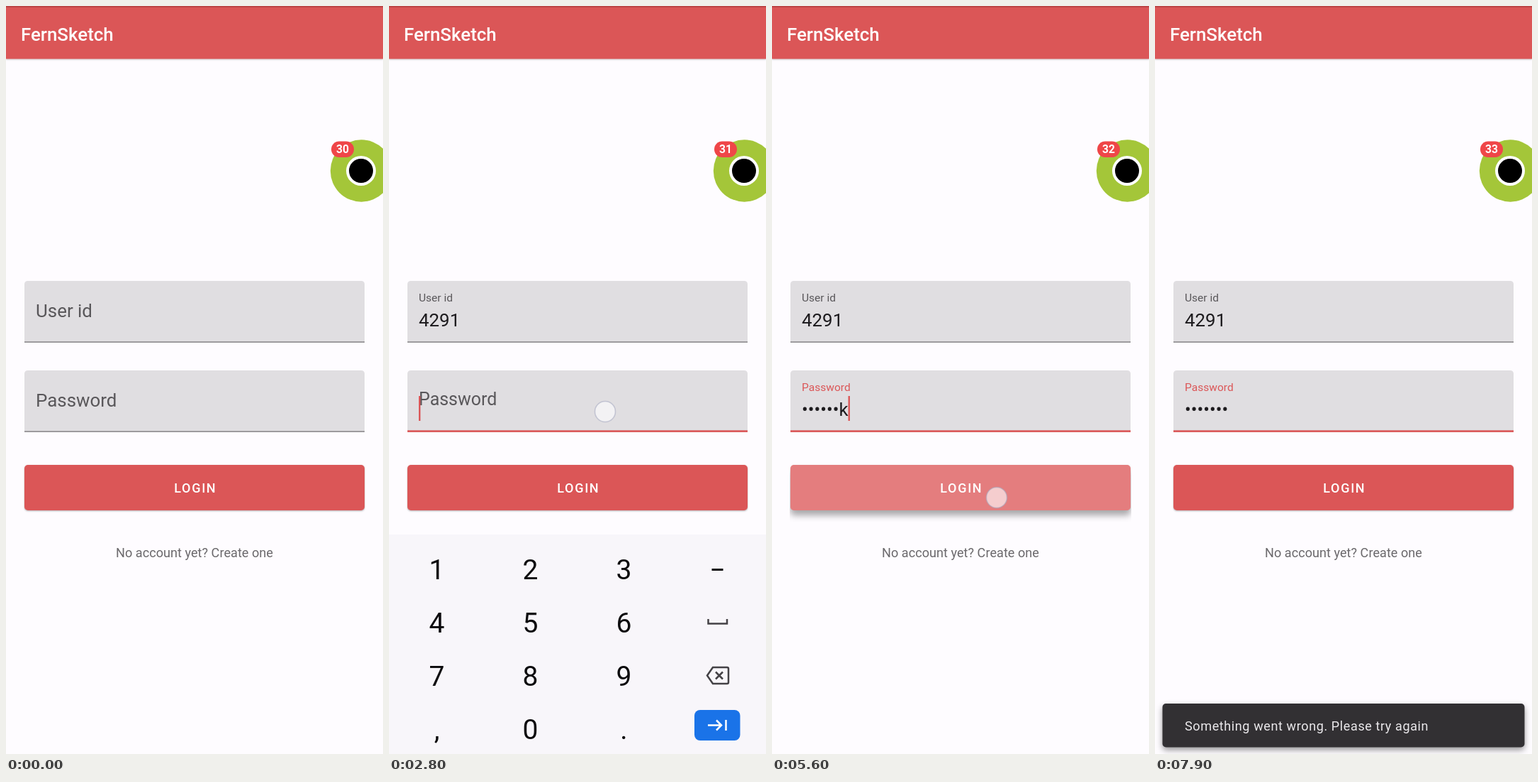
These frames come from a looping animation (532x1053 px, 8000 ms). An HTML page:

```html
<!DOCTYPE html>
<html lang="en">
<head>
<meta charset="utf-8">
<title>Login form</title>
<style>
  html, body { margin: 0; width: 100%; height: 100%; overflow: hidden; background: #fefcff; }
  svg { display: block; width: 100vw; height: 100vh; font-family: Roboto, sans-serif; }
  .medium { font-weight: 500; }
  .mid { text-anchor: middle; }
  .icon { fill: none; stroke: #444246; stroke-width: 2.5; }
  .white { fill: none; stroke: #fff; stroke-width: 2.5; }
  .value { font-size: 25.9px; fill: #1d1b1e; }
</style>
</head>
<body>
<svg id="stage" viewBox="0 0 532 1053">
  <defs>
    <clipPath id="buttonClip"><rect x="26" y="646" width="480" height="64" rx="5"/></clipPath>
    <clipPath id="shadowClip"><rect x="25" y="640" width="482" height="100"/></clipPath>
  </defs>
  <rect width="532" height="1053" fill="#fefcff"/>
  <rect width="532" height="74.5" fill="#db5657" style="filter:drop-shadow(0 1px 1px #0003)"/>
  <rect width="532" height="2" fill="#bd4546"/>
  <text class="medium" x="21" y="48.5" font-size="25.9" fill="#fff">FernSketch</text>

  <g id="fields"></g>

  <g clip-path="url(#shadowClip)"><rect id="button" x="26" y="646" width="480" height="64" rx="5" fill="#db5657"/></g>
  <g clip-path="url(#buttonClip)"><circle id="ripple" cx="317" cy="692" fill="#fff"/></g>
  <text class="medium mid" x="267.3" y="685" font-size="18.1" letter-spacing="1.62" fill="#fff">LOGIN</text>
  <text class="mid" x="266" y="775.5" font-size="18.15" fill="#6b696c">No account yet? Create one</text>

  <circle cx="501.5" cy="232" r="43.7" fill="#a4c639"/>
  <circle cx="501" cy="232" r="21" fill="#fff"/>
  <circle cx="501" cy="232" r="17" fill="#000"/>
  <rect x="459" y="190.5" width="32" height="22.5" rx="11.2" fill="#ef4648"/>
  <text id="badge" class="mid" x="475" y="207.3" font-size="15.6" font-weight="700" fill="#fff"></text>

  <g id="numberPad"></g>
  <g id="letterPad"></g>

  <g id="snack">
    <rect x="10.5" y="982" width="511" height="61.5" rx="5" fill="#323033" style="filter:drop-shadow(0 4px 4px #0006)"/>
    <text x="42" y="1020" font-size="18.1" letter-spacing=".57" fill="#eae8eb">Something went wrong. Please try again</text>
  </g>
  <circle id="touch" r="14.5" fill="#fff" fill-opacity=".62" stroke="#a4a8c0" stroke-opacity=".55" stroke-width="1.6"/>
</svg>
<script>
const LOOP = 8000, RED = '#db5657';
const USER_ID = '4291', PASSWORD = 'fhdjghk';
const USER_FOCUS = 900, PASSWORD_FOCUS = 2770, MASK_DELAY = 1500;
const $ = id => document.getElementById(id);

function add(parent, tag, attrs, content = '') {
  const node = document.createElementNS('http://www.w3.org/2000/svg', tag);
  set(node, attrs);
  node.textContent = content;
  parent.appendChild(node);
  return node;
}
function set(node, attrs) {
  for (const name in attrs) node.setAttribute(name, attrs[name]);
}
const progress = (t, start, length) => Math.min(1, Math.max(0, (t - start) / length));
const smooth = p => p * p * (3 - 2 * p);
const lerp = (a, b, p) => a + (b - a) * p;
const show = (node, visible) => set(node, { visibility: visible ? 'visible' : 'hidden' });

function makeField(top, name) {
  const g = $('fields'), bottom = top + 86.5;
  add(g, 'path', { d: `M26 ${bottom}V${top + 5}q0-5 5-5H501q5 0 5 5V${bottom}z`, fill: '#e0dee1' });
  return {
    top,
    line: add(g, 'rect', { x: 26, width: 480 }),
    label: add(g, 'text', { x: 42 }, name),
    value: add(g, 'text', { x: 42, y: top + 64, class: 'value' }),
    cursor: add(g, 'rect', { y: top + 36, width: 2.4, height: 35, fill: RED })
  };
}

const keys = {};
function keyRow(pad, chars, x, step, y, size) {
  [...chars].forEach((char, i) => {
    const cx = x + i * step;
    add(pad, 'text', { x: cx, y, class: 'mid', 'font-size': size, fill: '#0c0b0d' }, char);
    keys[pad.id + char] = [cx + 2, y - 4];
  });
}
const icon = (pad, d, cls = 'icon') => add(pad, 'path', { d, class: cls });
const backspace = (pad, x, y) =>
  icon(pad, `M${x - 15} ${y}l8-11.5h20q2 0 2 2v19q0 2-2 2h-20zM${x - 3} ${y - 5}l10 10m0-10l-10 10`);
const blueKey = (pad, x, y) =>
  add(pad, 'rect', { x, y, width: 64.5, height: 43, rx: 8, fill: '#1a73e8' });

function buildNumberPad() {
  const pad = $('numberPad');
  add(pad, 'rect', { y: 744, width: 532, height: 309, fill: '#f8f6fa' });
  ['123', '456', '789', ',0.'].forEach((row, i) => keyRow(pad, row, 67.5, 132, 807 + i * 75, 39));
  set(icon(pad, 'M455.500 793.500h16'), { style: 'stroke:#0c0b0d;stroke-width:3' });
  icon(pad, 'M450.500 863v6.500h26.500v-6.500');
  backspace(pad, 464, 942.5);
  blueKey(pad, 431, 991);
  icon(pad, 'M450 1012.500h19m-7-7l7 7l-7 7M475.500 1005v15', 'white');
}

function buildLetterPad() {
  const pad = $('letterPad'), step = 52.7;
  add(pad, 'rect', { y: 688, width: 532, height: 365, fill: '#f8f6fa' });
  add(pad, 'rect', { y: 688, width: 532, height: 57, fill: '#f1f2f5' });
  keyRow(pad, '1234567890', 28.5, step, 728.5, 29.5);
  keyRow(pad, 'qwertyuiop', 29, step, 794, 34);
  keyRow(pad, 'asdfghjkl', 55, step, 870, 34);
  keyRow(pad, 'zxcvbnm', 107.5, step, 946, 34);
  keyRow(pad, ',.', 108, 316, 1022, 30);
  icon(pad, 'M41.500 924l13.500 14h-7v11h-13v-11h-7z');
  backspace(pad, 490, 938);
  add(pad, 'text', { x: 41.5, y: 1019, class: 'mid medium', 'font-size': 23.2, fill: '#444246' }, '?123');
  add(pad, 'circle', { cx: 160, cy: 1011, r: 13, class: 'icon' });
  add(pad, 'ellipse', { cx: 160, cy: 1011, rx: 5.5, ry: 13, class: 'icon', style: 'stroke-width:2' });
  set(icon(pad, 'M148 1006.500h24M148 1015.500h24'), { style: 'stroke-width:2' });
  add(pad, 'rect', { x: 199.5, y: 992, width: 185.5, height: 37.5, rx: 4, fill: '#e0dee1' });
  add(pad, 'text', { x: 292, y: 1017, class: 'mid', 'font-size': 16.8, fill: '#1d1b1e' }, 'English');
  blueKey(pad, 457.5, 989);
  icon(pad, 'M480 1011l6.500 6.500l14-14', 'white');
}

const userField = makeField(387, 'User id');
const passwordField = makeField(513, 'Password');
buildNumberPad();
buildLetterPad();

const userTimes = [...USER_ID].map((_, i) => 1700 + i * 200);
const passwordTimes = [...PASSWORD].map((_, i) => 3500 + i * 150);

// Each tap: press time, release time, x, y.
const taps = [
  [800, 1000, 300, 438],
  ...userTimes.map((time, i) => [time - 100, time, ...keys['numberPad' + USER_ID[i]]]),
  [2700, 2900, 305, 571],
  ...passwordTimes.map((time, i) => [time - 100, time, ...keys['letterPad' + PASSWORD[i]]]),
  [4800, 4900, 488, 1014],
  [5400, 5700, 317, 692]
];

function masked(t) {
  const count = passwordTimes.filter(time => time <= t).length;
  if (!count) return '';
  const plain = t < passwordTimes[count - 1] + MASK_DELAY;
  return plain ? '•'.repeat(count - 1) + PASSWORD[count - 1] : '•'.repeat(count);
}

function drawField(field, t, focusTime, focused, text, times) {
  const { top, line, label, value, cursor } = field;
  const p = smooth(progress(t, focusTime, 170));
  set(line, focused
    ? { y: top + 84.3, height: 2.6, fill: RED }
    : { y: top + 85.4, height: 1.3, fill: '#777578' });
  set(label, {
    y: lerp(top + 51.3, top + 29.3, p),
    'font-size': lerp(25.9, 15.55, p),
    fill: focused && p > .4 ? RED : '#59575a'
  });
  value.textContent = text;
  const lastInput = Math.max(focusTime, ...times.filter(time => time <= t));
  show(cursor, focused && (t - lastInput) % 1000 < 500);
  set(cursor, { x: 42 + (text ? value.getComputedTextLength() : 0) });
}

function draw(t) {
  const inPassword = t >= PASSWORD_FOCUS;
  const typed = USER_ID.slice(0, userTimes.filter(time => time <= t).length);
  drawField(userField, t, USER_FOCUS, t >= USER_FOCUS && !inPassword, typed, userTimes);
  drawField(passwordField, t, PASSWORD_FOCUS, inPassword, masked(t), passwordTimes);

  $('badge').textContent = 30 + [1000, 2900, 5800].filter(time => t >= time).length;

  const rise = 1 - (1 - progress(t, 1000, 300)) ** 2;
  show($('numberPad'), t >= 1000 && t < 3100);
  set($('numberPad'), { transform: `translate(0 ${309 * (1 - rise)})` });
  show($('letterPad'), t >= 3100 && t < 5200);
  set($('letterPad'), { transform: `translate(0 ${365 * progress(t, 4950, 250) ** 2})` });

  const lift = progress(t, 5400, 150) * (1 - progress(t, 5750, 150));
  $('button').style.filter =
    `drop-shadow(0 ${lerp(1.5, 7, lift)}px ${lerp(1.3, 5, lift)}px rgba(0,0,0,${lerp(.3, .34, lift)}))`;
  set($('ripple'), {
    r: 320 * smooth(progress(t, 5400, 200)),
    opacity: .23 * (1 - progress(t, 5700, 250))
  });

  const appear = progress(t, 5850, 150), scale = lerp(.8, 1, smooth(appear));
  set($('snack'), {
    opacity: appear,
    transform: `translate(266 1013) scale(${scale}) translate(-266 -1013)`
  });

  const tap = taps.find(([down, up]) => t >= down && t < up);
  show($('touch'), tap);
  if (tap) set($('touch'), { cx: tap[2], cy: tap[3] });
}

function tick() {
  draw(performance.now() % LOOP);
  requestAnimationFrame(tick);
}
tick();
</script>
</body>
</html>
```
